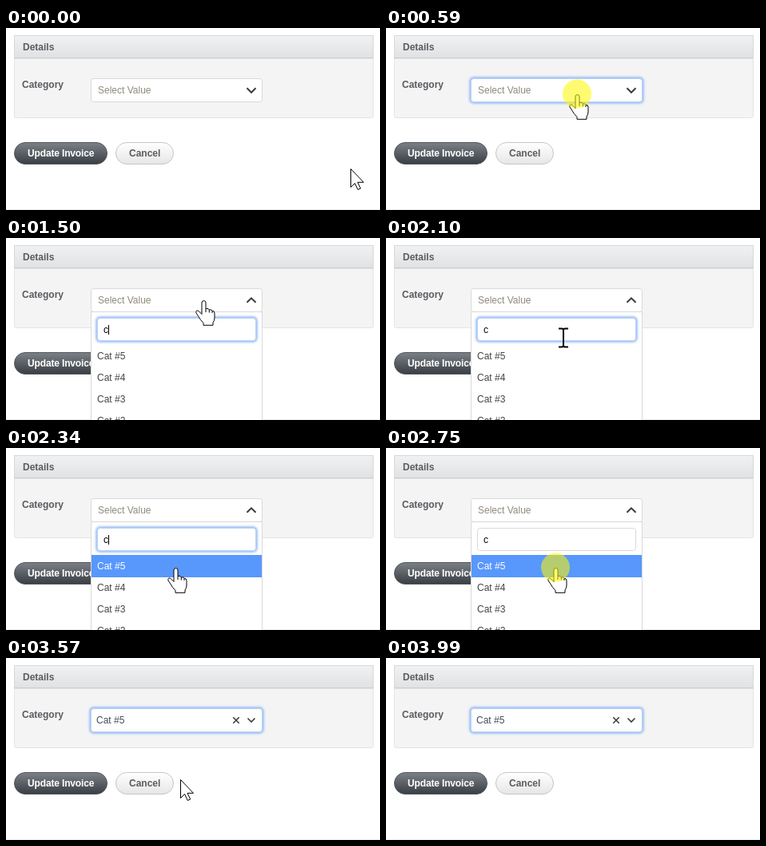
An HTML page that plays this animation: 468x228 px, repeating every 4070 ms.

```html
<!DOCTYPE html>
<html lang="en">
<head>
<meta charset="utf-8">
<title>Category select</title>
<style>
html, body { margin: 0; width: 100%; height: 100%; overflow: hidden; background: #fff; }
svg { display: block; width: 468px; height: 228px; }
text { font: 12px "Liberation Sans", Arial, sans-serif; fill: #444; }
.bold { font-weight: bold; fill: #5a5c60; }
.hint { fill: #8f8a7c; }
.glow { fill: none; stroke: #86b3fa; stroke-width: 4; filter: blur(1.7px); }
.ring { fill: none; stroke: #bdd3f4; }
.box { fill: #fff; stroke: #d9d9d9; }
.icon { fill: none; stroke: #3c3c3c; stroke-width: 2; }
.thin { stroke-width: 1.6; }
.caret { fill: #000; }

/* every part shares one 4070 ms loop and changes in hard steps */
.a { animation: 4070ms step-end infinite; }
.closed { animation-name: closed; }
.open { animation-name: open; }
.focus { animation-name: focus; }
.blank { animation-name: blank; }
.chosen { animation-name: chosen; }
.field { animation-name: field; }
.empty { animation-name: empty; }
.typed { animation-name: typed; }
.full { animation-name: full; }
.found { animation-name: found; }
.hover { animation-name: hover; }
.caret1 { animation-name: caret1; }
.caret2 { animation-name: caret2; }
.press { animation-name: press; }
.arrow { animation-name: arrow; }
.hand { animation-name: hand; }
.beam { animation-name: beam; }
.cursor { animation-name: move; }

@keyframes closed { 0% { opacity: 1 } 16.46%, 100% { opacity: 0 } }
@keyframes open { 0%, 69.53%, 100% { opacity: 0 } 16.46% { opacity: 1 } }
@keyframes focus { 0%, 16.46% { opacity: 0 } 14.49%, 69.53%, 100% { opacity: 1 } }
@keyframes blank { 0% { opacity: 1 } 69.53%, 100% { opacity: 0 } }
@keyframes chosen { 0% { opacity: 0 } 69.53%, 100% { opacity: 1 } }
@keyframes field { 0% { opacity: 1 } 65.6%, 100% { opacity: 0 } }
@keyframes empty { 0% { opacity: 1 } 32.67%, 100% { opacity: 0 } }
@keyframes typed { 0% { opacity: 0 } 32.67%, 100% { opacity: 1 } }
@keyframes full { 0% { opacity: 1 } 36.85%, 100% { opacity: 0 } }
@keyframes found { 0% { opacity: 0 } 36.85%, 100% { opacity: 1 } }
@keyframes hover { 0% { opacity: 0 } 53.56%, 100% { opacity: 1 } }
@keyframes caret1 { 0% { opacity: 1 } 28.5%, 100% { opacity: 0 } }
@keyframes caret2 { 0%, 41.03%, 65.6%, 100% { opacity: 0 } 32.67%, 53.56% { opacity: 1 } }
@keyframes press { 0%, 18.42%, 69.53%, 100% { opacity: 0 } 14.49%, 65.6% { opacity: 1 } }
@keyframes arrow { 0%, 69.53% { opacity: 1 } 10.31%, 98.03%, 100% { opacity: 0 } }
@keyframes hand { 0%, 51.59%, 69.53%, 100% { opacity: 0 } 10.31%, 53.56% { opacity: 1 } }
@keyframes beam { 0%, 53.56%, 100% { opacity: 0 } 51.59% { opacity: 1 } }
@keyframes move {
  0% { transform: translate(431px, 176px) }
  2.45% { transform: translate(421px, 171px) }
  4.42% { transform: translate(372px, 147px) }
  6.38% { transform: translate(301px, 113px) }
  8.35% { transform: translate(254px, 94px) }
  10.31% { transform: translate(239px, 83px) }
  16.46% { transform: translate(240px, 82px) }
  18.42% { transform: translate(241px, 81px) }
  20.39% { transform: translate(243px, 80px) }
  22.35% { transform: translate(244px, 80px) }
  26.53% { transform: translate(246px, 79px) }
  28.5% { transform: translate(247px, 78px) }
  49.63% { transform: translate(240px, 91px) }
  51.59% { transform: translate(222px, 125px) }
  53.56% { transform: translate(215px, 140px) }
  55.52% { transform: translate(213px, 147px) }
  57.49% { transform: translate(212px, 150px) }
  69.53% { transform: translate(212px, 149px) }
  87.71% { transform: translate(218px, 152px) }
  89.68% { transform: translate(250px, 165px) }
  91.64% { transform: translate(310px, 188px) }
  93.61% { transform: translate(370px, 207px) }
  95.57%, 100% { transform: translate(412px, 222px) }
}
</style>
</head>
<body>
<svg viewBox="0 0 468 228">
  <defs>
    <linearGradient id="head" x2="0" y2="1"><stop stop-color="#f0f1f2"/><stop offset="1" stop-color="#e0e2e4"/></linearGradient>
    <linearGradient id="dark" x2="0" y2="1"><stop stop-color="#7b8187"/><stop offset="1" stop-color="#393e43"/></linearGradient>
    <linearGradient id="light" x2="0" y2="1"><stop stop-color="#fff"/><stop offset="1" stop-color="#e6e6e6"/></linearGradient>
  </defs>

  <!-- page -->
  <rect x="10.5" y="9.5" width="449" height="103" rx="2" fill="#f4f4f4" stroke="#e4e4e4"/>
  <rect x="10.5" y="9.5" width="449" height="28" fill="url(#head)" stroke="#d6d8da"/>
  <path d="M10 37.5H460" stroke="#cbcdd0"/>
  <path d="M10 38.5H460" stroke="#e6e6e8"/>
  <text class="bold" x="21" y="28">Details</text>
  <text class="bold" x="20" y="75">Category</text>
  <rect x="10.5" y="143.5" width="116" height="27" rx="13.5" fill="url(#dark)" stroke="#50565b"/>
  <text class="bold" x="27" y="161" style="fill:#fff;letter-spacing:-.15px">Update Invoice</text>
  <rect x="137.5" y="143.5" width="72" height="27" rx="13.5" fill="url(#light)" stroke="#c6c6c6"/>
  <text class="bold" x="154" y="161">Cancel</text>
  <path d="M0 227.5H468" stroke="#ededed"/>

  <!-- select -->
  <rect class="a focus glow" x="106.5" y="63.5" width="214" height="29" rx="3"/>
  <rect class="box" x="106.5" y="63.5" width="214" height="29" rx="3"/>
  <rect class="a focus ring" x="106.5" y="63.5" width="214" height="29" rx="3"/>
  <text class="a blank hint" x="115" y="82">Select Value</text>
  <path class="a closed icon" d="M301.500 75.300l5.500 5.500 5.500-5.500"/>
  <g class="a chosen">
    <text x="113" y="82" style="fill:#3f4c5a">Cat #5</text>
    <path class="icon thin" d="M284.300 74.300l7.400 7.400m0-7.400l-7.400 7.400"/>
    <path class="icon thin" d="M302.500 75.500l4.500 4.500 4.500-4.500"/>
  </g>

  <!-- dropdown -->
  <g class="a open">
    <path class="icon" d="M301.500 80.800l5.500-5.500 5.500 5.500"/>
    <rect class="a full box" x="106.5" y="92.5" width="214" height="97" rx="2"/>
    <rect class="a found box" x="106.5" y="92.5" width="214" height="160"/>
    <rect class="a field glow" x="114.5" y="100.5" width="198" height="28" rx="3"/>
    <rect class="box" x="114.5" y="100.5" width="198" height="28" rx="3"/>
    <rect class="a field ring" x="114.5" y="100.5" width="198" height="28" rx="3"/>
    <text class="a empty" x="122" y="119" style="fill:#bdbdb2">Search</text>
    <text class="a typed" x="122" y="119" style="fill:#000">c</text>
    <rect class="a caret1 caret" x="122" y="109" width="1" height="12"/>
    <rect class="a caret2 caret" x="128" y="109" width="1" height="12"/>
    <g class="a full">
      <text x="114" y="152">Cat #2</text>
      <text x="114" y="179">Cat #3</text>
    </g>
    <g class="a found">
      <text x="114" y="152">Cat #5</text>
      <text x="114" y="179">Cat #4</text>
      <text x="114" y="206">Cat #3</text>
      <text x="114" y="233">Cat #2</text>
    </g>
    <g class="a hover">
      <rect x="107" y="134" width="213" height="28" fill="#5897fb"/>
      <text x="114" y="152" style="fill:#fff">Cat #5</text>
    </g>
  </g>

  <!-- pointer -->
  <g class="a cursor" fill="#fff" stroke="#000" stroke-linejoin="round">
    <path class="a arrow" d="M.5 .5V23.500L5.500 18.500L9.300 26.500L12.700 25L9 17.300H16.500Z"/>
    <g class="a hand">
      <path d="M-2 3Q-2 .6 .5 .6T3 3V10.500Q6.800 9.600 7.300 12Q10.600 11 11 13.500Q14 13 14 16V22Q14 25.500 12 28V31.300H0V28.500Q-4 24.500 -6 20.500L-9 16Q-10 12.500 -6.500 13L-2 17.500Z"/>
      <path d="M3 10.500V15M7.300 12V15.500M11 13.500V16" fill="none"/>
    </g>
    <path class="a beam" fill="none" stroke-width="2" d="M-6-11.500H-2Q0-11.500 0-9.500Q0-11.500 2-11.500H6M0-9.500V9.500M-6 11.500H-2Q0 11.500 0 9.500Q0 11.500 2 11.500H6"/>
    <circle class="a press" cy="-.5" r="18" fill="#fff800" fill-opacity=".56" stroke="none"/>
  </g>
</svg>
</body>
</html>
```
